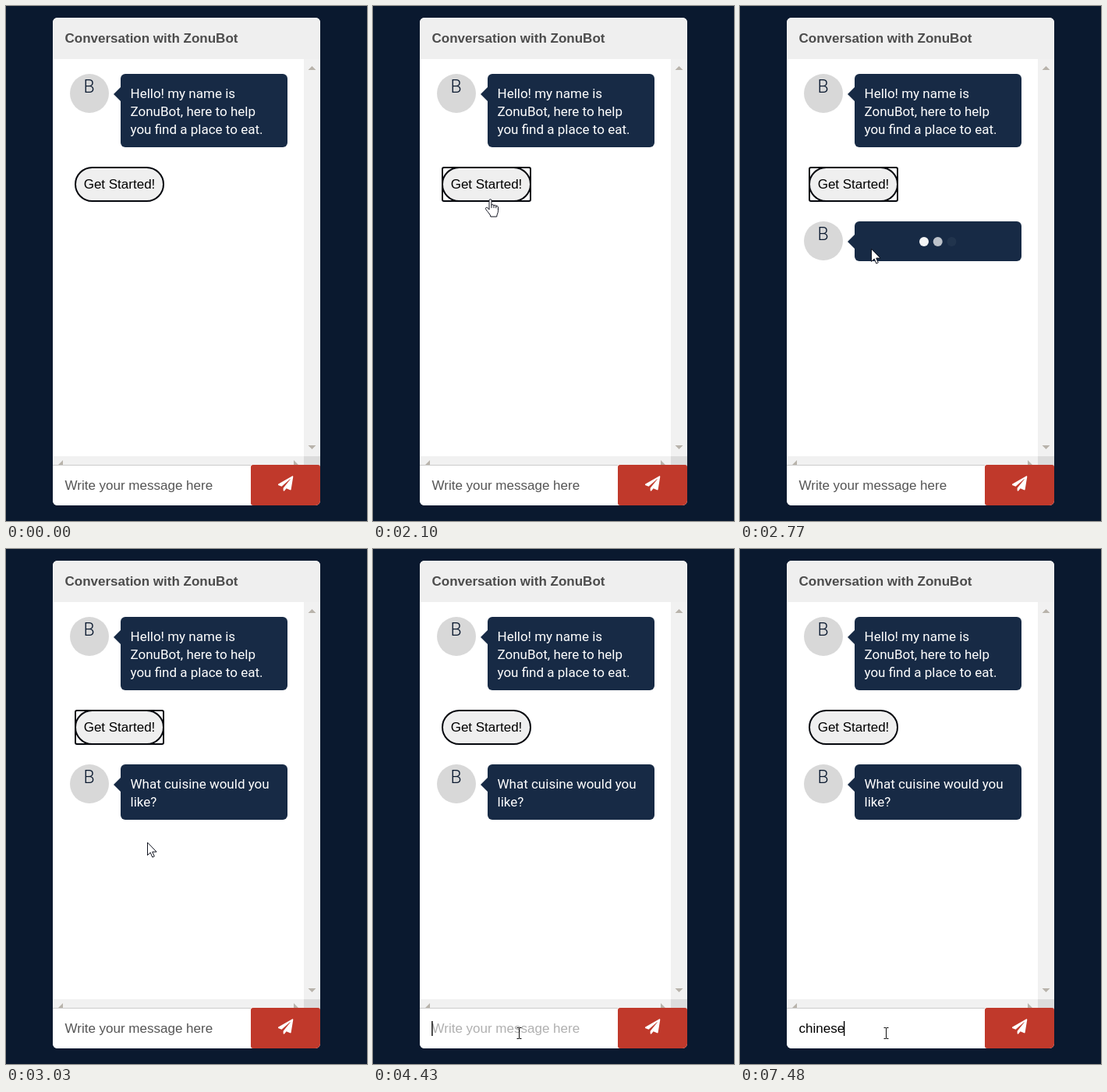
An HTML page that plays this animation: 463x660 px, repeating every 8000 ms.

```html
<!DOCTYPE html>
<html lang="en">
<head>
<meta charset="utf-8">
<title>Chat bot</title>
<style>
  html, body { margin: 0; width: 100%; height: 100%; overflow: hidden; background: #0a192f; }
  svg { display: block; width: 463px; height: 660px; }
  text { font: 17px "Liberation Sans", Arial, sans-serif; white-space: pre; }
  .title { font-weight: bold; fill: #4c4c4c; }
  .say { font-family: Roboto, sans-serif; fill: #fff; }
  .initial { font: 300 23px Roboto, sans-serif; fill: #0a192f; text-anchor: middle; }
  .bubble { fill: #172a45; }
  .avatar { fill: #d8d8d8; }
  .bar { fill: #f1f1f1; }
  .arrow { fill: #b8b3ab; }
  .line { fill: none; stroke: #05070d; stroke-width: 2; }
  .pointer { fill: #fff; stroke: #10131f; stroke-linejoin: round; stroke-linecap: round; }
</style>
</head>
<body>
<svg viewBox="0 0 463 660">
  <defs>
    <clipPath id="panel"><rect x="60" y="15" width="343" height="625" rx="6"/></clipPath>
    <g id="speaker">
      <circle class="avatar" cx="107" cy="25" r="25"/>
      <text class="initial" x="106.5" y="24">B</text>
      <path class="bubble" d="M138 26l9.5-9.5v19z"/>
    </g>
  </defs>

  <g clip-path="url(#panel)">
    <rect x="60" y="15" width="343" height="625" fill="#fff"/>
    <rect x="60" y="15" width="343" height="53" fill="#efefef"/>
    <rect class="bar" x="382" y="68" width="21" height="509"/>
    <rect class="bar" x="60" y="577" width="322" height="11"/>
    <rect x="382" y="577" width="21" height="14" fill="#dcdcdc"/>
    <path class="arrow" d="M387.5 82l5-5 5 5zM387.5 563l5 5 5-5zM67 588l6-6v6zM375 588l-6-6v6z"/>
    <rect x="60" y="588" width="254" height="52" fill="#fff"/>
    <rect x="60" y="588" width="254" height="1" fill="#ccc"/>
    <rect x="314" y="588" width="89" height="52" rx="3" fill="#c0392b"/>
    <path fill="#fff" transform="translate(349 602.3) scale(.0377)" d="M476 3L12 271c-18 10-16 35 2 43l107 44 287-253c6-5 14 3 9 8L176 407v81c0 23 28 33 42 15l64-77 125 52c14 6 30-3 33-18l72-432C515 8 493-7 476 3z"/>
  </g>
  <text class="title" x="75.5" y="47">Conversation with ZonuBot</text>

  <use href="#speaker" y="87"/>
  <rect class="bubble" x="147" y="87" width="214" height="94" rx="6"/>
  <text class="say" x="159.5" y="118">Hello! my name is</text>
  <text class="say" x="159.5" y="141">ZonuBot, here to help</text>
  <text class="say" x="159.5" y="164">you find a place to eat.</text>

  <rect class="line" id="ring" x="89" y="207" width="113" height="43" rx="2"/>
  <rect class="line" x="89" y="207" width="113" height="43" rx="21.5" style="fill:#efefef"/>
  <text x="145.5" y="234" text-anchor="middle">Get Started!</text>

  <g id="reply">
    <use href="#speaker" y="276"/>
    <rect class="bubble" id="box" x="147" y="276" width="214" height="51" rx="6"/>
    <g id="dots" fill="#fff">
      <circle cx="236" cy="302" r="6"/>
      <circle cx="253.7" cy="302" r="6"/>
      <circle cx="271.5" cy="302" r="6"/>
    </g>
    <g id="question">
      <text class="say" x="159.5" y="307">What cuisine would you</text>
      <text class="say" x="159.5" y="330">like?</text>
    </g>
  </g>

  <text id="hint" x="75.5" y="620">Write your message here</text>
  <text id="typed" x="75.5" y="620"></text>
  <rect id="caret" y="605" width="1.4" height="19"/>

  <g id="cursor">
    <path class="pointer" id="arrow" d="M.5 .5v16l3.7-3.5 2.6 6 2.5-1.1-2.6-5.8h5z"/>
    <g class="pointer" id="hand" transform="translate(-6.5 0)">
      <path d="M5.5 13.5V2.2a1.5 1.5 0 0 1 3 0V8q1.6-1.2 3 .5 1.7-.9 2.8.7 2.3-.6 2.7 1.6v4.7c0 3-1.6 4-1.8 7.5H7.3C7.3 20.5 4.500 18 1.200 13.600 0 11.500 2.400 10.300 4 12z"/>
      <path fill="none" d="M8.500 8v3.500M11.500 8.500v3M14.300 9.200v2.500"/>
    </g>
    <path id="beam" fill="none" stroke="#111" d="M-3 -6.500h2.500l.5 1 .5-1H3M0 -6v13M-3 7.500h2.500l.5-1 .5 1H3"/>
  </g>
</svg>
<script>
const LOOP = 8000;
const CLICK = 2100, REPLY = 2200, ANSWER = 2950, FOCUS = 4340;
const $ = id => document.getElementById(id);
const show = (id, on) => { $(id).style.display = on ? '' : 'none'; };
const dots = [...$('dots').children];

// time at which each letter lands
const keys = [[6090, 'c'], [6220, 'h'], [6420, 'i'], [7060, 'n'], [7150, 'e'], [7300, 's'], [7480, 'e']];
const caretFlips = [FOCUS, 4840, 5350, 5910, 6090, 6970, 7060];

// time, x, y of the second pointer move
const path = [
  [2600, 150, 247], [2740, 165, 300], [2880, 179, 350], [3030, 181, 376],
  [3400, 184, 435], [3740, 187, 520], [3980, 189, 604], [4120, 188, 625], [4300, 187, 620]
];

function pointer(t) {
  if (t < path[0][0]) {
    const s = Math.min(1, (t - 690) / 760);
    const e = 1 - (1 - s) ** 3;
    return [379 - 229 * e, 581 - 334 * e];
  }
  const i = path.findIndex(p => p[0] > t);
  if (i < 0) return path.at(-1).slice(1);
  const [t0, x0, y0] = path[i - 1], [t1, x1, y1] = path[i];
  const s = (t - t0) / (t1 - t0);
  return [x0 + (x1 - x0) * s, y0 + (y1 - y0) * s];
}

function drawPointer(t) {
  show('cursor', t >= 690);
  if (t < 690) return;
  const [x, y] = pointer(t).map(Math.round);
  const onButton = y < 251, onInput = y >= 588 && x < 314;
  show('hand', onButton);
  show('beam', onInput);
  show('arrow', !onButton && !onInput);
  const half = onInput ? 0.5 : 0;
  $('cursor').setAttribute('transform', `translate(${x + half} ${y})`);
}

function drawReply(t) {
  const answered = t >= ANSWER;
  show('reply', t >= REPLY);
  show('dots', !answered);
  show('question', answered);
  $('box').setAttribute('height', answered ? 71 : 51);
  dots.forEach((dot, i) => {
    const age = t - REPLY - 250 * i;
    dot.setAttribute('opacity', age < 0 ? 1 : Math.sin(Math.PI * age / 1000) ** 2);
  });
}

function drawInput(t) {
  const word = keys.filter(k => k[0] <= t).map(k => k[1]).join('');
  const typed = $('typed');
  if (typed.textContent !== word) typed.textContent = word;
  show('hint', !word);
  $('hint').setAttribute('fill', t < FOCUS ? '#555' : '#b0b0b0');
  show('caret', caretFlips.filter(f => f <= t).length % 2);
  const width = word ? typed.getComputedTextLength() : 0;
  $('caret').setAttribute('x', 75.2 + Math.max(0, width - 0.9));
}

function draw(t) {
  show('ring', t >= CLICK && t < FOCUS);
  drawReply(t);
  drawInput(t);
  drawPointer(t);
}

const start = performance.now();
function tick() {
  draw((performance.now() - start) % LOOP);
  requestAnimationFrame(tick);
}
tick();
</script>
</body>
</html>
```
